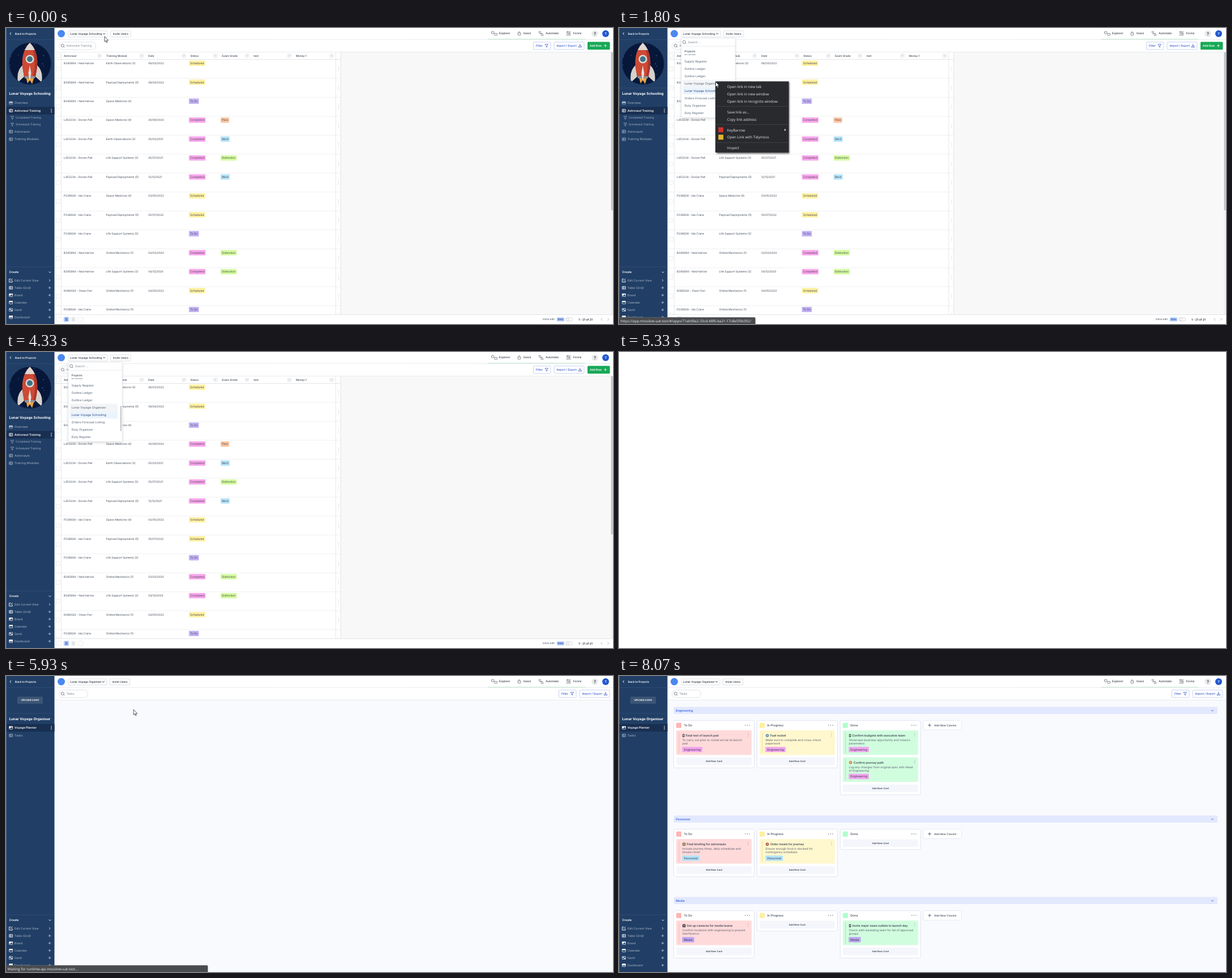
Write an HTML page with a canvas that moves like this. It is 1071x523 px and loops after 8.34 s.

```html
<!DOCTYPE html>
<html lang="en">
<head>
<meta charset="utf-8">
<title>Opening a project in a new tab</title>
<style>
html, body { margin: 0; width: 100%; height: 100%; overflow: hidden; background: #fff }
canvas { display: block }
</style>
</head>
<body>
<canvas id="stage" width="1071" height="523"></canvas>
<script>
const ctx = document.getElementById('stage').getContext('2d');
const LOOP = 8340;
const NAVY = '#213f66', DARK = '#192f51', MUTED = '#a8b5c7', INK = '#3c4654', BLUE = '#2c50c8';
const INTER = 'Inter, sans-serif', SYSTEM = '"Open Sans", sans-serif';
const TRAINING = 'Lunar Voyage Schooling', PLANNER = 'Lunar Voyage Organiser';

// Drawing helpers
function rect(x, y, w, h, fill, r = 0, stroke, lw = 0.7) {
  ctx.beginPath();
  ctx.roundRect(x, y, w, h, r);
  if (fill) { ctx.fillStyle = fill; ctx.fill(); }
  if (stroke) { ctx.strokeStyle = stroke; ctx.lineWidth = lw; ctx.stroke(); }
}
function circle(x, y, r, fill, stroke, lw) {
  rect(x - r, y - r, 2 * r, 2 * r, fill, r, stroke, lw);
}
// The given y is the middle of the capitals.
function text(s, x, y, size, color, weight = 400, align = 'left', family = INTER) {
  ctx.font = `${weight} ${size}px ${family}`;
  ctx.textRendering = 'geometricPrecision';
  ctx.textAlign = align;
  ctx.fillStyle = color;
  ctx.fillText(s, x, y + size * 0.36);
  return ctx.measureText(s).width;
}
function line(color, lw, ...p) {
  ctx.beginPath();
  for (let i = 0; i < p.length; i += 2) ctx.lineTo(p[i], p[i + 1]);
  ctx.strokeStyle = color;
  ctx.lineWidth = lw;
  ctx.stroke();
}
function shape(d, fill, stroke, lw = 0.7) {
  const p = new Path2D(d);
  if (fill) { ctx.fillStyle = fill; ctx.fill(p); }
  if (stroke) { ctx.strokeStyle = stroke; ctx.lineWidth = lw; ctx.stroke(p); }
}
function at(x, y, draw) {
  ctx.save();
  ctx.translate(x, y);
  draw();
  ctx.restore();
}
function shadow(color, blur, dx, dy, draw) {
  ctx.save();
  Object.assign(ctx, { shadowColor: color, shadowBlur: blur, shadowOffsetX: dx, shadowOffsetY: dy });
  draw();
  ctx.restore();
}
const chevron = (x, y, c, turn = 0, s = 2) => at(x, y, () => {
  ctx.rotate(turn * Math.PI / 2);
  line(c, 0.9, -s, -s / 2, 0, s / 2, s, -s / 2);
});
const plus = (x, y, c, s = 2.2) => { line(c, 0.8, x - s, y, x + s, y); line(c, 0.8, x, y - s, x, y + s); };
const dots = (x, y, c, dx, dy, r = 0.6) => { for (const k of [-1, 0, 1]) circle(x + k * dx, y + k * dy, r, c); };
const funnel = (x, y, c) => at(x, y, () => shape('M-2.7-2.5H2.7L.8 .2V2.7L-.8 2V.2Z', null, c));
function lens(x, y, c) {
  circle(x - 0.5, y - 0.5, 2.6, null, c, 0.7);
  line(c, 0.7, x + 1.4, y + 1.4, x + 3, y + 3);
}
function tag(s, x, y, color) {
  ctx.font = `400 4.9px ${INTER}`;
  rect(x, y - 4.7, ctx.measureText(s).width + 4, 9.4, color, 0.8);
  text(s, x + 2, y, 4.9, '#4a4453');
}
function viewIcon(kind, x, y, c) {
  if (kind === 'edit') {
    shape(`M${x} ${y - 2.5}H${x - 3}V${y + 3}H${x + 2.5}V${y}M${x - 1} ${y + 1}L${x + 3} ${y - 3}`, null, c, 0.9);
    return;
  }
  rect(x - 3, y - 2.5, 6, 5, null, 0.5, c);
  if (kind === 'grid') {
    for (const d of [-0.9, 0.9]) line(c, 0.6, x - 3, y + d, x + 3, y + d);
    line(c, 0.6, x - 1, y - 2.5, x - 1, y + 2.5);
  } else if (kind === 'board') {
    rect(x - 3, y - 2.5, 3, 3.2, c);
    rect(x + 0.8, y - 2.5, 2.2, 2.2, c);
  } else if (kind === 'gantt') {
    line(c, 1.3, x - 2.4, y - 1.4, x, y, x + 2.4, y + 1.4);
  } else rect(x - 3, y - 2.5, 6, kind === 'calendar' ? 2 : 3, c);
}

// Sidebar
function rocket() {
  ctx.save();
  ctx.beginPath();
  ctx.arc(42.5, 63, 37, 0, 7);
  ctx.clip();
  rect(5, 26, 76, 76, '#07173a');
  for (let i = 0; i < 26; i++) circle(6 + i * 29.3 % 73, 28 + i * 17.7 % 70, 0.35 + i % 3 * 0.15, '#8fa6c9');
  shape('M35 86L38 98L42 92L46 99L50 86Z', '#efa43a');
  shape('M29 66Q18 76 21 96L32 86ZM55 66Q66 76 63 96L52 86Z', '#d5d2cc');
  shape('M42 26C30 38 24 58 33 88H51C60 58 54 38 42 26Z', '#cd4a35');
  shape('M42 26C50 40 55 62 47 88H51C60 58 54 38 42 26Z', '#a9372d');
  shape('M42 26Q36 32 33 39H51Q48 32 42 26Z', '#ded9d2');
  rect(33, 85, 18, 4, '#8d9299', 1);
  circle(42, 55, 7.5, '#d9dbdc');
  circle(42, 55, 5, '#3f7183');
  shape('M42 66L44.5 80L42 94L39.5 80Z', '#e7e2da');
  ctx.restore();
  circle(42.5, 63, 37, null, '#16335a', 0.6);
}
function sideItem(label, y, kind, selected) {
  if (selected) {
    rect(0, y - 6.7, 85.5, 13.4, DARK);
    dots(80, y, '#fff', 0, 2.5, 0.8);
  }
  const c = selected ? '#fff' : MUTED;
  viewIcon(kind, 8.7, y, c);
  text(label, 15, y, selected ? 5.15 : 5.3, c, selected ? 600 : 400);
}
function sidebar(planner) {
  rect(0, 0, 85.5, 523, NAVY);
  chevron(8, 10, '#fff', 1, 2.2);
  text('Back to Projects', 16, 10, 4.75, '#fff', 600);
  const edge = planner ? 66 : 106;
  line('#38557b', 0.6, 0, 20.5, 85.5, 20.5);
  line('#38557b', 0.6, 0, edge, 85.5, edge);
  if (planner) {
    rect(20, 36.5, 45, 12.5, '#3b5576', 1.5);
    text('UPLOAD LOGO', 42.5, 42.7, 4.4, '#fff', 700, 'center');
    text(PLANNER, 5.5, 75.5, 6.2, '#fff', 700);
    sideItem('Voyage Planner', 91.5, 'board', true);
    sideItem('Tasks', 105, 'grid');
  } else {
    rocket();
    text(TRAINING, 5.5, 116, 6.2, '#fff', 700);
    sideItem('Overview', 132.5, 'dash');
    sideItem('Astronaut Training', 146, 'grid', true);
    ['Completed Training', 'Scheduled Training'].forEach((s, i) => {
      funnel(11, 158.5 + 12 * i, MUTED);
      text(s, 17, 158.5 + 12 * i, 4.85, MUTED);
    });
    sideItem('Astronauts', 183, 'grid');
    sideItem('Training Modules', 196.5, 'grid');
  }
  line('#38557b', 0.6, 0, 422, 85.5, 422);
  text('Create', 5.5, 431.5, 5.25, '#fff', 600);
  chevron(77.5, 431.5, '#fff');
  ['Edit Current View', 'Table (Grid)', 'Board', 'Calendar', 'Gantt', 'Dashboard'].forEach((s, i) => {
    const y = 446 + 13 * i;
    viewIcon(['edit', 'grid', 'board', 'calendar', 'gantt', 'dash'][i], 8.7, y, '#fff');
    text(s, 15, y, 5.2, MUTED);
    i ? plus(77, y, '#c8d1dd') : chevron(77, y, '#c8d1dd', -1);
  });
  line('#6f87a6', 0.8, 0.3, 0, 0.3, 523);
}

// Top bars
function button(label, x, w, icon) {
  rect(x, 24.8, w, 13.2, '#fff', 1.5, '#b3c0ee');
  text(label, x + 4.5, 31.2, 4.95, BLUE, 500);
  if (icon === 'filter') return funnel(x + 23.3, 31.2, BLUE);
  at(x + 45.8, 31.2, () => shape('M0-3V1M-1.6-.6L0 1L1.6-.6M-2.6 .8V2.6H2.6V.8', null, BLUE, 0.8));
}
function header(planner, open) {
  const dx = planner ? -1 : 0;
  rect(85.5, 0, 985.5, 42.5, '#fff');
  line('#dfe2e6', 0.7, 85.5, 20.3, 1071, 20.3);
  line('#dfe2e6', 0.7, 85.5, 42.5, 1071, 42.5);
  line('#cbe9d6', 1.2, 851, 19.7, 1022, 19.7);
  circle(97.5, 10, 6.5, '#4a88f0');
  rect(110, 5, 69 + dx, 11, '#fff', 1, '#cfd3d8');
  text(planner ? PLANNER : TRAINING, 113, 10.5, 4.85, '#222b38', 500);
  chevron(173 + dx, 10.2, '#222b38', open ? 2 : 0);
  rect(184.5 + dx * 1.3, 5, 35.5, 11, '#fff', 1, '#cfd3d8');
  text('Invite Users', 188.8 + dx * 1.3, 10.5, 4.75, '#222b38', 500);

  const c = '#555d68';
  rect(856.5, 6.5, 4.5, 3.5, null, 0.5, c);
  rect(862, 9.5, 4.5, 3.5, null, 0.5, c);
  rect(903, 8.8, 5, 3.8, null, 0.6, c);
  shape('M904 8.8V7.5Q905.5 5 907 7.5V8.8', null, c);
  shape('M939.5 7H944M941 9.7H947M943.5 12.4H948.5', null, c, 1);
  for (const y of [7, 9.7, 12.4]) line(c, 0.8, 988.5, y, 996.5, y);
  line(c, 1.2, 991, 6, 991, 8);
  line(c, 1.2, 994, 8.7, 994, 10.7);
  [['Explorer', 870], ['Users', 912.7], ['Automate', 952.3], ['Forms', 1000.8]]
    .forEach(([s, x]) => text(s, x, 9.7, 4.95, '#303844', 500));
  circle(1039, 10, 5.7, '#e7e9ec');
  text('?', 1039, 10.2, 7.5, '#333', 600, 'center');
  circle(1058, 10, 6, '#2458cf');
  text('T', 1058, 10.2, 5.6, '#fff', 600, 'center');

  rect(93.5, 24.7, planner ? 51 : 65, 13.6, '#fff', 6.8, '#d3d7dd');
  lens(100.3, 31.5, '#555d68');
  text(planner ? 'Tasks' : 'Astronaut Training', 106.5, 31.6, 5.15, '#7c838d');
  const shift = planner ? 45 : 0;
  button('Filter', 930.5 + shift, 30.5, 'filter');
  button('Import / Export', 967 + shift, 53, 'export');
  if (!planner) {
    rect(1026, 24.5, 39.5, 13.7, '#18a957', 1.5);
    text('Add Row', 1030, 31.2, 4.9, '#fff', 600);
    plus(1057.5, 31.2, '#fff', 2.4);
  }
}

// Training table
const people = ['B345894 - Ned Harlow', 'L453234 - Dorian Pell', 'P238928 - Ida Crane', 'N389320 - Owen Farr'];
const modules = ['Orbital Mechanics', 'Life Support Systems', 'Earth Observations', 'Space Medicine', 'Payload Deployments'];
const tagColor = {
  Scheduled: '#fdf1a0', 'To Do': '#c1b1f4', Completed: '#f8a6ec', Pass: '#fbc6a2', Merit: '#b4e3f8',
  Distinction: '#d3fb9f', Engineering: '#f1a5ef', Personnel: '#b1e3f9', Media: '#baa5f1'
};
const rows = `0 3 06/03/2022 Scheduled|0 5 09/04/2022 Scheduled|0 4|1 4 30/09/2020 Completed Pass
1 3 05/03/2021 Completed Merit|1 2 05/07/2021 Completed Distinction|1 5 12/12/2021 Completed Merit
2 4 03/05/2022 Scheduled|2 5 05/07/2022 Scheduled|2 2|0 1 03/03/2020 Completed Distinction
0 2 04/12/2020 Completed Distinction|3 1 04/05/2022 Scheduled|2 1`.split(/[|\n]/).map(r => r.split(' '));

function table() {
  rect(85.5, 42.8, 505, 480, '#fff');
  rect(590.5, 42.8, 480.5, 464, '#f8f8f8');
  rect(1067, 42.8, 4, 464, '#f1f1f1');
  rect(1067.6, 43, 3, 279, '#c1c1c1');
  rect(88.5, 45.5, 7, 7, '#fff', 1, '#dfe2e6');
  [['Astronaut', 102, 165], ['Training Module', 177, 239.3], ['Date', 251, 314], ['Status', 325.3, 369.5],
   ['Exam Grade', 381, 425.3], ['test', 437, 500], ['Money 1', 511.5, 574.5]].forEach(([s, x, end]) => {
    text(s, x, 49, 4.75, INK, 500);
    rect(end - 3, 46, 6, 6, '#fff', 1.5, '#c9cdd3', 0.6);
    chevron(end, 49.1, '#69717d', 0, 1.1);
  });
  line('#d5d8dc', 0.7, 85.5, 55.5, 590.5, 55.5);
  rows.forEach(([who, mod, date, status = 'To Do', grade], i) => {
    const y = 62.3 + 33.47 * i;
    text(people[who], 102, y, 4.85, INK);
    text(`${modules[mod - 1]} (${mod})`, 176.6, y, 4.85, INK);
    if (date) text(date, 251, y, 4.85, INK);
    tag(status, 322.7, y, tagColor[status]);
    if (grade) tag(grade, 378.7, y, tagColor[grade]);
    rect(88.5, y + 6.5, 7, 7, '#fff', 1, '#e3e6ea');
    dots(587, y + 10, '#9aa0a8', 0, 2.7, 0.5);
    ctx.setLineDash([1.2, 0.8]);
    line('#d3d6da', 0.6, 85.5, y + 26.7, 590.5, y + 26.7);
    ctx.setLineDash([]);
  });
  for (const x of [97.5, 581.8, 590.7]) line('#dcdfe3', 0.7, x, 43, x, 506.5);

  rect(85.5, 506.5, 985.5, 16.5, '#fff');
  line('#d8dbdf', 0.7, 85.5, 506.5, 1071, 506.5);
  [94, 106.5, 118.7, 131.5].forEach((x, i) => {
    const on = i === 1;
    rect(x - 4.3, 510.8, 8.6, 8, on ? '#cfdefb' : '#fff', 1, on ? '#9fbcf3' : '#e1e4e8');
    if (on || i === 2) for (const d of [-2, 0, 2]) line(on ? '#3764cf' : '#aab0b8', on ? 1.2 : 0.7, x - 2.6, 514.8 + d, x + 2.6, 514.8 + d);
  });
  text('Inline edit', 947, 514.8, 4.6, INK);
  rect(972, 511.4, 13, 6.8, '#a9c4f7', 1.5);
  text('Beta', 978.5, 514.8, 4.1, '#2247a0', 500, 'center');
  rect(988, 512, 11.5, 5.8, '#fff', 2.9, '#c3c8ce');
  circle(991, 514.9, 2.5, '#fff', '#b7bcc3', 0.6);
  text('1 - 21 of 21', 1010, 514.8, 5, '#222b38', 600);
  chevron(1051, 514.8, '#a8aeb6', 1);
  chevron(1062.5, 514.8, '#a8aeb6', -1);
}

// Project list, opening downwards from its top edge
function dropdown(t) {
  const p = Math.min(1, (t - 470) / 300), e = 1 - (1 - p) ** 3;
  ctx.save();
  ctx.globalAlpha = e;
  ctx.translate(0, 18 * (1 - e));
  ctx.scale(1, e || 0.001);
  shadow('rgba(0,0,0,.14)', 5, 0, 2, () => rect(109.8, 18, 95.4, 140.5, '#fff', 1.5));
  rect(109.8, 18, 95.4, 140.5, null, 1.5, '#dde0e5');
  lens(115.5, 25.3, '#555d68');
  text('Search ...', 121.6, 25, 5.2, '#7c838d');
  line('#dfe2e6', 0.7, 110, 32.3, 205, 32.3);
  text('Projects', 115.5, 40.8, 4.9, INK, 500);
  ctx.beginPath();
  ctx.rect(110, 46, 95, 112);
  ctx.clip();
  if (t >= 1333) rect(112.5, 91.6, 84.5, 13, '#f3f4f6');
  rect(112.5, 104.6, 84.5, 13, '#ebf4fd');
  ['Errands', 'Supply Register', 'Outline Ledger', 'Outline Ledger', PLANNER, TRAINING, 'Orders Forecast Listing', 'Duty Organiser', 'Duty Register']
    .forEach((s, i) => text(s, 115.5, 46 + 13.05 * i, 5.35, s === TRAINING ? '#27477c' : '#566378'));
  rect(201.6, 95, 2.2, 45, '#c3c6cb', 1.1);
  ctx.restore();
}
function contextMenu(mouse) {
  shadow('rgba(0,0,0,.6)', 3, 1.5, 1.5, () => rect(170, 94.5, 129.5, 125.5, '#292a2d'));
  rect(170.3, 94.8, 129, 125, null, 0, '#45464a', 0.6);
  if (mouse[0] > 173 && mouse[1] > 97) rect(170.6, 97.5, 128.4, 12.8, '#4b4c4f');
  [['Open link in new tab', 104], ['Open link in new window', 117], ['Open link in incognito window', 129.7],
   ['Save link as...', 148.5], ['Copy link address', 161.3], ['KeyBarrow', 180.3], ['Open Link with Tidymoss', 193.2], ['Inspect', 212]]
    .forEach(([s, y]) => text(s, 190.7, y, 6.35, '#e8eaed', 400, 'left', SYSTEM));
  for (const y of [138.5, 170.5, 202.5]) line('#47484b', 0.7, 170.5, y, 299, y);
  rect(175.3, 175.5, 8.8, 8.8, '#d2322d');
  rect(175.3, 188.5, 8.8, 8.8, '#e3b52f');
  shape('M292 178L295 180L292 182Z', '#d5d7da');
}

// Planner board
const groups = [
  [61, 'Engineering', [
    [['Final test of launch pad', 'To carry out prior to rocket arrival at launch', 'pad', 21, '#555']],
    [['Fuel rocket', 'Make sure to complete and cross-check', 'paperwork', 23.5, '#5f8fb8']],
    [['Confirm budgets with executive team', 'Showcase business opportunity and mission', 'parameters', 21, '#3d7a4b'],
     ['Confirm journey path', 'Log any changes from original spec with Head', 'of Engineering', 23.5, '#d9853b']]]],
  [253, 'Personnel', [
    [['Final briefing for astronauts', 'Include journey times, daily schedules and', 'mission brief', 23, '#8c7a4a']],
    [['Order meals for journey', 'Ensure enough food is stocked for', 'contingency schedules', 23.5, '#b5533f']],
    []]],
  [397, 'Media', [
    [['Set up cameras for media teams', 'Confirm locations with engineering to prevent', 'interference', 23.3, '#4b4550']],
    [],
    [['Invite major news outlets to launch day', 'Check with marketing team for list of approved', 'groups', 21.5, '#4f5b55']]]]
];
const stages = [['To Do', '#ffb4b4', '#ffdada', '#f5bdbd'], ['In Progress', '#fdefa0', '#fff7ce', '#f0dfa0'], ['Done', '#b0fdcd', '#d1fddf', '#a9e3bd']];

function card([title, one, two, dx, icon], x, y, group, fill, stripe) {
  rect(x + 4.5, y, 133, 43.5, fill, 1.5);
  line(stripe, 1, x + 9.3, y + 3.5, x + 9.3, y + 40);
  dx < 22 ? rect(x + 15.5, y + 6.5, 3.6, 5.5, icon, 0.8) : rect(x + 15.5, y + 6.5, 5.5, 5.5, icon, dx === 23.5 ? 2.7 : 1);
  circle(x + (dx < 22 ? 17.3 : 18.2), y + 9.2, 1, '#efe8d8');
  text(title, x + dx, y + 9.2, 5.2, INK, 600);
  text(one, x + 15.2, y + 17.3, 5.15, '#59616e');
  text(two, x + 15.2, y + 23.5, 5.15, '#59616e');
  ctx.font = `400 5.25px ${INTER}`;
  rect(x + 15, y + 29.2, ctx.measureText(group).width + 6, 9.4, tagColor[group], 1);
  text(group, x + 18, y + 33.9, 5.25, '#43394d');
  dots(x + 131.5, y + 7.8, '#8b9098', 0, 2.5, 0.55);
}
function board(loaded) {
  rect(85.5, 42.8, 985.5, 480.5, '#f9fafe');
  if (!loaded) return;
  for (const [y, name, columns] of groups) {
    rect(96.5, y - 6.5, 959.5, 12.6, '#e2e8fd', 2);
    text(name, 100.3, y, 5.2, '#3a67e0', 600);
    chevron(1047, y, '#3a67e0');
    columns.forEach((cards, i) => {
      const x = 96.5 + 146.9 * i, n = cards.length * 47.6, [label, mark, fill, stripe] = stages[i];
      rect(x, y + 17.6, 142, 36.2 + n, '#fff', 3, '#d3dbec');
      rect(x + 4.5, y + 21.7, 9, 9, mark, 1);
      text(label, x + 18, y + 26.1, 5.3, INK, 500);
      dots(x + 130, y + 26.1, '#7d848e', 3.6, 0, 0.8);
      cards.forEach((c, k) => card(c, x, y + 35 + 47.6 * k, name, fill, stripe));
      rect(x + 4.5, y + 35.5 + n, 133, 13.4, '#f4f6fc', 2);
      text('Add New Card', x + 71, y + 42.3 + n, 4.2, INK, 600, 'center');
    });
    rect(536.8, y + 17.6, 67.6, 16.8, '#fff', 3, '#dbe1ef');
    plus(548, y + 26, '#3c4654', 3);
    text('Add New Column', 556, y + 26, 4.75, INK, 500);
  }
}

function statusBar(s, w) {
  rect(0, 511.3, w, 12, '#4a4b4f', [0, 2, 0, 0], '#6b6c70', 0.6);
  text(s, 2.8, 517.5, 6.25, '#eef0f2', 400, 'left', SYSTEM);
}

// Pointer path: time, x, y
const path = [
  [0, 174, 15], [70, 174, 15], [270, 171, 17], [770, 171, 17], [1130, 171, 22], [1203, 171, 22], [1400, 170.5, 95],
  [1870, 170.5, 95], [2470, 217, 105], [3065, 217, 105], [3270, 210, 33], [3400, 210, 33], [3530, 213, 39],
  [3865, 213, 39], [4000, 224.5, 30], [5470, 226, 22], [5800, 230.5, 40], [6200, 214, 99], [6270, 214, 99],
  [6330, 217, 100], [6400, 217, 100], [6600, 100, 143], [6800, 32.5, 124.5], [6930, 32, 120], [7003, 32, 120],
  [7130, 134, 132], [7465, 134, 132], [7667, 112, 523]
];
function pointer(t) {
  const i = path.findIndex(k => k[0] > t);
  if (i < 0) return path.at(-1).slice(1);
  const [a, b] = [path[i - 1], path[i]], k = (t - a[0]) / (b[0] - a[0]);
  return [a[1] + (b[1] - a[1]) * k, a[2] + (b[2] - a[2]) * k];
}

function draw(t) {
  const mouse = pointer(t), planner = t >= 5330;
  rect(0, 0, 1071, 523, '#fff');
  if (planner && t < 5470) return;
  planner ? board(t >= 6130) : table();
  header(planner, t >= 470 && !planner);
  sidebar(planner);
  if (!planner && t >= 470) dropdown(t);
  if (t >= 1800 && t < 2800) contextMenu(mouse);
  if (t >= 1333 && t < 2070) statusBar('https://app.mosslow-uat.test/#/apps/71ab90e2-33cd-48f6-ba21-17c8e5f0b392/', 240.5);
  if (t >= 5600 && t < 7733) statusBar('Waiting for runtime-api.mosslow-uat.test...', 356);
  if (t < 4330 || (planner && t < 7667))
    at(...mouse, () => shape('M0 0V9.3L2.1 7.4L3.5 10.7L5 10L3.6 6.9H6.4Z', '#fff', '#111', 0.7));
}
function frame(now) {
  draw(now % LOOP);
  requestAnimationFrame(frame);
}
requestAnimationFrame(frame);
</script>
</body>
</html>
```
